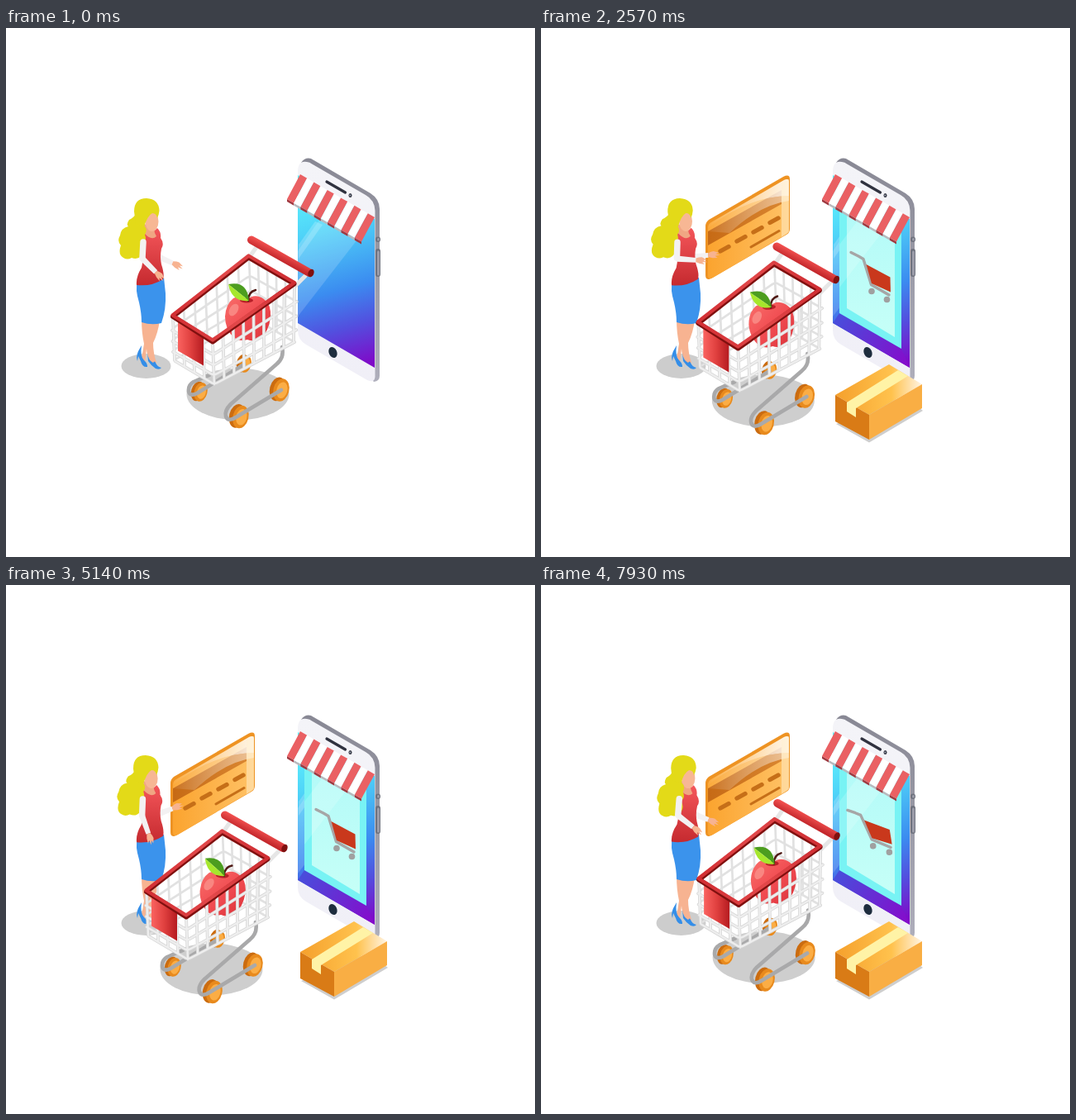
An HTML page for the animation above (8000 ms loop, 640 by 640 pixels).

```html
<!DOCTYPE html>
<html lang="en">
<head>
<meta charset="utf-8">
<title>Mobile shopping</title>
<style>
html, body { margin: 0; width: 100%; height: 100%; overflow: hidden; background: #fff; }
svg { display: block; width: 100vw; height: 100vh; }
</style>
</head>
<body>
<svg viewBox="0 0 640 640">
<defs>
  <linearGradient id="screen" gradientUnits="userSpaceOnUse" x1="368" y1="190" x2="432" y2="408">
    <stop offset="0" stop-color="#5ef3fd"/><stop offset=".25" stop-color="#4fd3f8"/>
    <stop offset=".58" stop-color="#3b8cf0"/><stop offset=".78" stop-color="#5250df"/><stop offset="1" stop-color="#7f0ac8"/>
  </linearGradient>
  <linearGradient id="floor" gradientUnits="userSpaceOnUse" x1="353" y1="350" x2="446" y2="405">
    <stop offset="0" stop-color="#4650dc"/><stop offset="1" stop-color="#860bcb"/>
  </linearGradient>
  <linearGradient id="panel" x2="0" y2="1"><stop stop-color="#b2faf8"/><stop offset="1" stop-color="#c6fff7"/></linearGradient>
  <linearGradient id="side" x2="0" y2="1"><stop stop-color="#888894"/><stop offset="1" stop-color="#aeaebb"/></linearGradient>
  <linearGradient id="body" x2="0" y2="1"><stop stop-color="#f4f4f8"/><stop offset="1" stop-color="#f0eff7"/></linearGradient>
  <linearGradient id="face" x2="1"><stop stop-color="#fba42f"/><stop offset="1" stop-color="#ffc266"/></linearGradient>
  <linearGradient id="stripe" x2="1"><stop stop-color="#c66a15"/><stop offset="1" stop-color="#d98530"/></linearGradient>
  <linearGradient id="glare" x2="1"><stop stop-color="#fff" stop-opacity=".08"/><stop offset="1" stop-color="#fff" stop-opacity=".85"/></linearGradient>
  <linearGradient id="sheen" x2="1"><stop stop-color="#fff" stop-opacity=".05"/><stop offset="1" stop-color="#fff" stop-opacity=".5"/></linearGradient>
  <linearGradient id="lid" x2="1"><stop stop-color="#f5a02c"/><stop offset=".65" stop-color="#ffc24d"/><stop offset="1" stop-color="#fff4e4"/></linearGradient>
  <linearGradient id="flag" x2="1"><stop stop-color="#fa6360"/><stop offset=".5" stop-color="#e0403f"/><stop offset="1" stop-color="#b51b20"/></linearGradient>
  <linearGradient id="top" x2="0" y2="1"><stop stop-color="#f4565a"/><stop offset="1" stop-color="#c52a2f"/></linearGradient>
  <linearGradient id="fruit" x2="1" y2="1"><stop stop-color="#f96f6b"/><stop offset=".55" stop-color="#f04a50"/><stop offset="1" stop-color="#d93239"/></linearGradient>
  <linearGradient id="bar" gradientUnits="userSpaceOnUse" x1="336" y1="271" x2="331" y2="281">
    <stop stop-color="#f25150"/><stop offset="1" stop-color="#c4282c"/>
  </linearGradient>
  <linearGradient id="rim" gradientUnits="userSpaceOnUse" x1="200" y1="340" x2="350" y2="310">
    <stop stop-color="#d22e33"/><stop offset=".5" stop-color="#e2484a"/><stop offset="1" stop-color="#cf2d32"/>
  </linearGradient>
  <clipPath id="inside"><path d="M353 178L446 231V411L353 357Z"/></clipPath>
</defs>

<g id="phone">
  <path d="M357 163Q362 156 369 158L441 200Q452 207 452 219V421Q452 427 445 428L420 400Z" fill="url(#side)"/>
  <path d="M353 174Q353 160 364 162Q367 162 371 165L435 202Q446 208 446.500 221V422Q446 430 437 426L363 383Q353 377 353 366Z" fill="url(#body)"/>
  <path d="M353 178L446 231V411L353 357Z" fill="url(#screen)"/>
  <path d="M353 270L382 228L425 256L353 349Z" fill="#fff" opacity=".16"/>
  <path d="M354 262L374 234L383 238L354 279Z" fill="#fff" opacity=".2"/>
  <g clip-path="url(#inside)"><g id="popup">
    <path d="M353 357L361 345L436 388L446 411Z" fill="url(#floor)"/>
    <path d="M361 202L436 245V388L361 345Z" fill="#78f3f4"/>
    <path d="M370 216L428 249V374L370 339Z" fill="url(#panel)"/>
    <path d="M361 262L384 232L412 248L361 314Z" fill="#fff" opacity=".16"/>
    <g id="icon" fill="none" stroke="#a6a6a6" stroke-linecap="round" stroke-linejoin="round">
      <path d="M375 271.500L384 276L390 279.500L399.500 310.500L421 323" stroke-width="3.400"/>
      <path d="M393.500 286L422.500 301.500L423 319.500L400 309Z" fill="#c9381c" stroke="none"/>
      <g fill="#a0a0a0" stroke="none"><circle cx="400" cy="318.500" r="3.800"/><circle cx="418.500" cy="328.500" r="3.800"/></g>
    </g>
  </g></g>
  <path d="M388 186L410.500 199" stroke="#30323f" stroke-width="3.200" stroke-linecap="round"/>
  <ellipse cx="416.500" cy="202.500" rx="2" ry="2.600" fill="#30323f"/><circle cx="416.300" cy="202.500" r=".9" fill="#aeb6c4"/>
  <ellipse cx="395.500" cy="392.500" rx="4.800" ry="6.800" transform="rotate(-24 395.500 392.500)" fill="#1e2d3e"/>
  <path d="M450 255.500V256M450 270V298" stroke="#6f727e" stroke-width="6" stroke-linecap="round"/>
  <path d="M450.500 255.500V256M450.500 271V298" stroke="#9a9ba8" stroke-width="3" stroke-linecap="round"/>
  <g id="awning"></g>
</g>

<g id="card">
  <path d="M199 240Q199 235 203 232L293 180Q301 176 301 183V243Q301 248 297 250L206 303Q199 306 199 299Z" fill="#ee9323"/>
  <path d="M202 242Q202 237 206 235L294 184Q300 181 300 186V243Q300 248 296 250L208 302Q202 305 202 299Z" fill="url(#face)"/>
  <path d="M202 246L291 196V213L202 263Z" fill="url(#stripe)"/>
  <path d="M202 242Q202 237 206 235L294 184Q300 181 300 186V203Q250 204 202 242Z" fill="url(#glare)"/>
  <path d="M202 242Q250 204 300 203V209Q264 214 228 248L202 246Z" fill="url(#sheen)"/>
  <path d="M291 188L300 183V247L291 253Z" fill="#fff0d0" opacity=".5"/>
  <path d="M217 270L227 264.500M237 258L247 252.500M257 247L267 241.500M277 235.500L287 230" stroke="#c66f18" stroke-width="5.400" stroke-linecap="round"/>
  <path d="M254 265L288 245.500" stroke="#c66f18" stroke-width="3" stroke-linecap="round"/>
</g>

<g id="parcel">
  <path d="M357 479L397 501.500L462 463L440 445Z" fill="#cecece"/>
  <g id="carton">
    <path d="M356 444L421 407L461 431L397 468Z" fill="url(#lid)"/>
    <path d="M356 444L397 468V498L356 476Z" fill="#d97b16"/>
    <path d="M397 468L461 431V460L397 498Z" fill="#f9ae44"/>
    <path d="M370 453L432 414L444 421L381 460V471L370 464Z" fill="#fff3a6"/>
  </g>
</g>

<g id="woman">
  <ellipse cx="169.500" cy="409" rx="30" ry="15" fill="#cdcdcd"/>
  <path d="M164 352L186 353Q184 369 178 381Q178 393 182 405L176 407Q170 396 170 388L168 405L163 402Q166 391 167 382Q164 368 164 352Z" fill="#f7b391"/>
  <path d="M164 384Q162 397 167 402Q171 405 171 410Q165 411 163 403L160 397L159 403Q157 398 160 391ZM171 393Q172 402 178 405Q180 402 181 405Q183 410 188 411Q186 414 181 412Q176 409 172 403Z" fill="#348ee8"/>
  <path d="M159 306Q156 316 161 332Q164 345 164 356Q176 360 188 357Q194 340 193 321L191 302Z" fill="#3b93ec"/>
  <g id="torso">
    <g id="backArm"></g>
    <path d="M167 244Q175 251 183 242Q188 247 187 254Q192 261 188 267Q186 277 188 286Q192 298 190 304Q176 313 158 311Q157 301 164 290Q168 274 163 262Z" fill="url(#top)"/>
    <path d="M167 237L180 240Q178 246 182 252Q176 258 167 248Z" fill="#f0a683"/>
    <ellipse cx="176.500" cy="234" rx="8" ry="12" fill="#f7b794"/>
    <path id="tail" d="M158 224Q154 230 149 232Q145 238 148 240Q139 242 138 251Q134 258 139 263Q135 274 142 278Q147 281 152 278Q160 281 165 274Q169 268 165 261Q171 258 168 250Q172 244 167 239Q170 230 170 221Z" fill="#e3da18"/>
    <path d="M155 222Q155 206 170 206Q185 207 185.500 221Q185 226 183 230Q182 224 177 224Q171 227 167 241L157 237Z" fill="#e3da18"/>
    <path d="M166 259L165 278" stroke="#f3f1f2" stroke-width="7.500" stroke-linecap="round"/>
    <g id="frontArm"></g>
  </g>
</g>

<g id="cart" fill="none" stroke-linecap="round" stroke-linejoin="round">
  <ellipse cx="280.500" cy="443" rx="62" ry="31.500" fill="#cecece"/>
  <g id="wheels"></g>
  <g stroke="#a9a9aa" stroke-width="4.600">
    <path d="M246 420L227 428Q220 432 221 440Q223 446 231 442L288 407"/>
    <path d="M334 386Q337 399 327 407L272 455Q264 463 266 470Q269 477 278 471L333 438"/>
  </g>
  <path d="M303 265L294 278M362 300L350 312" stroke="#e6e6e6" stroke-width="5"/>
  <g id="backWires"></g>
  <g id="apple">
    <path d="M291 329Q301 320 312 328Q321 334 320 350Q318 367 308 376Q300 380 292 377Q283 380 275 374Q265 364 265 349Q266 334 275 327Q284 322 291 329Z" fill="url(#fruit)"/>
    <ellipse cx="275.500" cy="341" rx="5" ry="8" transform="rotate(32 275.500 341)" fill="#f98681"/>
    <ellipse cx="291" cy="329.500" rx="8" ry="3" fill="#b81f28"/>
    <path d="M293 330Q293 319 302 317" stroke="#4f1914" stroke-width="2.500"/>
    <path d="M269 310Q292 305 294 330Z" fill="#4c9d1f"/>
    <path d="M269 310L294 330Q273 332 269 310Z" fill="#a6e72c"/>
  </g>
  <g id="frontWires"></g>
  <path d="M208 353L239 371V408.500L208 390.500Z" fill="url(#flag)"/>
  <path d="M202 349L293.500 277.500L348.500 309.500L250 379.500Z" stroke="#80100f" stroke-width="6"/>
  <path d="M201.500 347.500L293.500 275.500L349 308L250 377.500Z" stroke="url(#rim)" stroke-width="4.200"/>
  <path d="M297 256.500L367 296" stroke="url(#bar)" stroke-width="10"/>
  <ellipse cx="369" cy="296.500" rx="3.400" ry="5" transform="rotate(24 369 296.500)" fill="#80100f"/>
</g>
</svg>
<script>
const LOOP = 8000;
const el = id => document.getElementById(id);
const mix = (a, b, k) => [a[0] + (b[0] - a[0]) * k, a[1] + (b[1] - a[1]) * k];
const pt = p => p.map(n => n.toFixed(1)).join(' ');
const line = (...p) => 'M' + p.map(pt).join('L');

// Awning: eleven slanted stripes with a short valance
function awning() {
  let s = '';
  for (let i = 0; i < 11; i++) {
    const [a, b] = [i / 11, (i + 1) / 11].map(k => mix([356, 177], [446, 229], k));
    const [c, d] = [i / 11, (i + 1) / 11].map(k => mix([340, 207], [430, 258.5], k));
    const low = p => [p[0], p[1] + 3];
    const red = i % 2 === 0;
    s += `<path d="${line(c, d, low(d), low(c))}Z" fill="${red ? '#a03940' : '#b9b9bd'}"/>` +
         `<path d="${line(a, b, d, c)}Z" fill="${red ? '#ea6063' : '#fff'}"/>`;
  }
  el('awning').innerHTML = s;
}

// Basket corners: left, front, right, back
const upper = { l: [202, 349], f: [250, 380], r: [349, 310], k: [294, 278] };
const lower = { l: [204, 402], f: [252, 431], r: [348, 380], k: [297, 350] };

function wires(mid, counts) {
  let d = '';
  for (const h of [.3, .55, .79, 1]) {
    const [a, b, c] = ['l', mid, 'r'].map(n => mix(upper[n], lower[n], h));
    const out = h < 1 ? 3 : 1;
    a[0] -= out;
    c[0] += out;
    d += line(mix(a, b, .03), mix(a, b, .94)) + 'Q' + pt(b) + ' ' + pt(mix(b, c, .04)) + 'L' + pt(c);
  }
  [['l', mid], [mid, 'r']].forEach(([a, b], s) => {
    for (let i = 0; i <= counts[s]; i++) {
      const k = i / counts[s];
      d += line(mix(upper[a], upper[b], k), mix(lower[a], lower[b], k));
    }
  });
  return d;
}

function basket() {
  el('backWires').innerHTML = `<path d="${wires('k', [7, 5])}" stroke="#e1e1e1" stroke-width="2.700"/>`;
  const d = wires('f', [4, 8]);
  el('frontWires').innerHTML = `<path d="${d}" stroke="#d5d5d5" stroke-width="3.800"/>` +
    `<path d="${d}" stroke="#eeeeee" stroke-width="2.300"/>`;
}

function wheel(x, y, k) {
  const oval = (dx, rx, ry, fill) => `<ellipse cx="${dx}" rx="${rx}" ry="${ry}" fill="${fill}"/>`;
  return `<g transform="translate(${x} ${y}) rotate(14) scale(${k})">` +
    oval(-2.5, 9.5, 14.5, '#cb6c10') + oval(2, 9.5, 14, '#e88a1d') + oval(3, 6.5, 10, '#fbad45') + '</g>';
}

function arm(id, sleeve) {
  el(id).innerHTML = `<path d="M0 -3.600L${sleeve} -2.800V3L0 3.600Q-4 0 0 -3.600Z" fill="#f3f1f2"/>` +
    `<path transform="translate(${sleeve} 0)" d="M0 -2.200Q4 -4 7 -4L13 -1.500L9 -.5L14 1.500L8 2L11 4.500L5 4L0 2.200Z" fill="#f7b391"/>`;
}

awning();
basket();
el('wheels').innerHTML = [[288, 406, .76], [234, 440, .83], [331, 437.500, 1], [282, 470, 1]].map(w => wheel(...w)).join('');
arm('backArm', 18);
arm('frontArm', 23);

// Smooth curve through [time, value] keys, flat at turning points
function track(keys, t) {
  const n = keys.length - 1;
  if (t <= keys[0][0]) return keys[0][1];
  if (t >= keys[n][0]) return keys[n][1];
  let i = 0;
  while (t >= keys[i + 1][0]) i++;
  const rate = j => (keys[j + 1][1] - keys[j][1]) / (keys[j + 1][0] - keys[j][0]);
  const slope = j => {
    if (j === 0) return rate(0);
    if (j === n) return rate(n - 1);
    const a = rate(j - 1), b = rate(j);
    return a * b <= 0 ? 0 : 2 * a * b / (a + b);
  };
  const [t0, v0] = keys[i], [t1, v1] = keys[i + 1];
  const w = t1 - t0, u = (t - t0) / w, q = 1 - u;
  return v0 * (1 + 2 * u) * q * q + slope(i) * w * u * q * q +
         v1 * u * u * (3 - 2 * u) - slope(i + 1) * w * u * u * q;
}

const clamp = u => Math.min(1, Math.max(0, u));
const ease = (t, from, to) => (1 - Math.cos(Math.PI * clamp((t - from) / (to - from)))) / 2;
const spring = t => t <= 0 ? 0 : 1 - Math.exp(-t * .0026) * Math.cos(t * Math.PI / 350);

const sway = [[0, 0], [1860, -3], [3700, -4.7], [4400, -4.2], [6070, 1], [7000, 3.5], [8000, 5]];
const appleTilt = [[0, 0], [1860, -3.7], [2500, -4], [3210, -3.2], [4210, 0], [6070, 5], [7000, 2.7], [8000, -.8]];
const frontTilt = [[0, 45], [1860, -1], [3210, 17], [4210, 59], [5200, 71], [6070, 68], [7000, 51], [8000, 35]];
const backTilt = [[0, 24], [1860, 0], [3210, -10], [4210, -20], [4900, -21], [6070, -12], [7000, 8], [8000, 21]];
const cartonTilt = [[700, -45], [1300, -20], [1860, -7.6], [2300, 0]];
const iconTilt = [[7680, 0], [7930, -7.5], [8000, -9.5]];

const move = (id, value) => el(id).setAttribute('transform', value);
const turn = (id, a, x, y) => move(id, `rotate(${a} ${x} ${y})`);
const zoom = (id, k, x, y) => {
  el(id).style.display = k > 0 ? '' : 'none';
  move(id, `translate(${x} ${y}) scale(${k}) translate(${-x} ${-y})`);
};

function draw(t) {
  // The springs have come to rest well before the cart leaves
  zoom('popup', t < 2000 ? spring(t - 70) : 1, 399, 295);
  zoom('card', t < 2000 ? spring(t - 200) : 1, 250, 241);
  zoom('parcel', Math.sin(clamp((t - 700) / 800) * Math.PI / 2), 408, 452);
  turn('carton', track(cartonTilt, t), 408, 452);
  turn('icon', track(iconTilt, t), 380, 304);

  const s = track(sway, t);
  turn('torso', s * .3, 174, 308);
  turn('tail', -s * .9, 170, 222);
  move('frontArm', `translate(165 279) rotate(${track(frontTilt, t)})`);
  move('backArm', `translate(185 277) rotate(${track(backTilt, t)})`);

  const out = ease(t, 1420, 4210) - ease(t, 5860, 9290);
  move('cart', `translate(${-32 * out} ${22 * out})`);
  turn('apple', track(appleTilt, t), 293, 378);
}

const start = performance.now();
function tick() {
  draw((performance.now() - start) % LOOP);
  requestAnimationFrame(tick);
}
tick();
</script>
</body>
</html>
```
